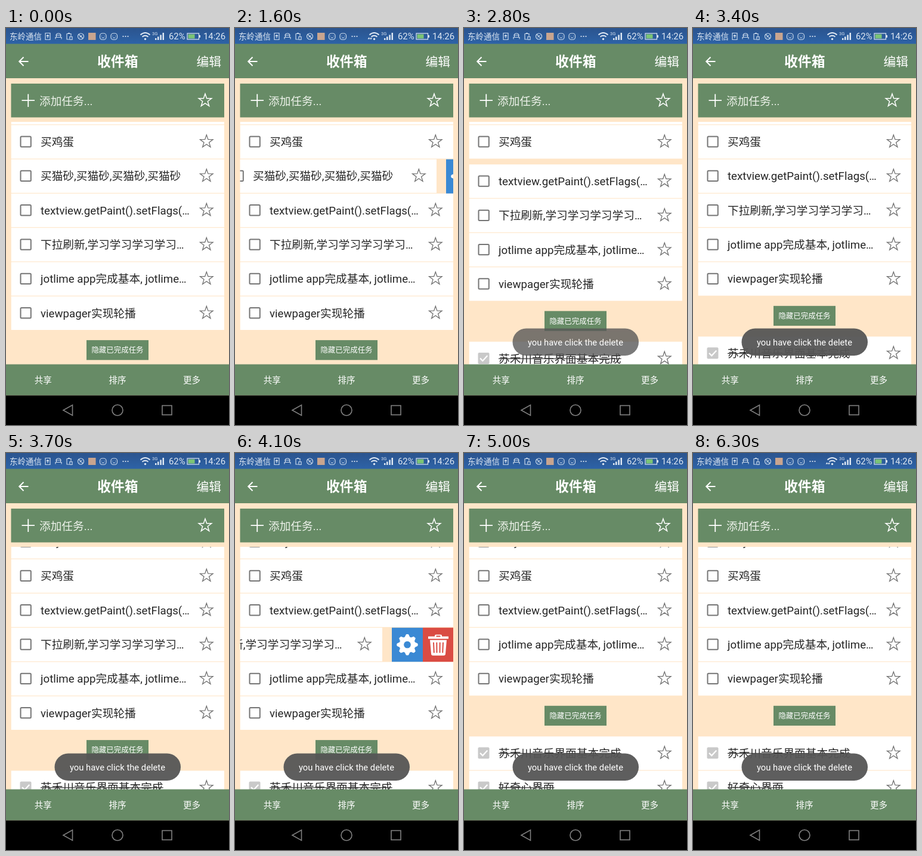
Recreate the animation shown at these times as an HTML page. Size 374 by 664 pixels, loop 6.4 s.

```html
<!DOCTYPE html>
<html lang="zh-CN">
<head>
<meta charset="utf-8">
<title>收件箱</title>
<style>
html, body { margin: 0; width: 100%; height: 100%; overflow: hidden; background: #000; }
svg { display: block; width: 374px; height: 664px; }
text { font-family: Roboto, "Noto Sans CJK SC", "Noto Sans CJK", sans-serif; white-space: pre; }
.mid { text-anchor: middle; }
.line { fill: none; stroke: #fff; }
</style>
</head>
<body>
<svg id="stage" viewBox="0 0 374 664">
  <defs>
    <linearGradient id="sky" x1="0" y1="0" x2="0" y2="1">
      <stop offset="0" stop-color="#2b548e"/><stop offset="1" stop-color="#2d63a8"/>
    </linearGradient>
    <clipPath id="listClip"><rect x="8.5" y="157" width="357.5" height="406"/></clipPath>
  </defs>
  <rect width="374" height="664" fill="#ffe6c8"/>
  <g id="list" clip-path="url(#listClip)"></g>

  <g id="status">
    <rect width="374" height="27" fill="url(#sky)"/>
    <g fill="#dfe8f3">
      <text x="6" y="19" font-size="13.5">东岭通信</text>
      <text x="273" y="19" font-size="14.9">62%</text>
      <text x="331" y="19" font-size="14.9">14:26</text>
      <text x="245" y="11.5" font-size="7.5">3G</text>
      <circle cx="196.5" cy="14" r="1.1"/><circle cx="200.5" cy="14" r="1.1"/><circle cx="204.5" cy="14" r="1.1"/>
      <path d="M250 20v-3h2.5v3zM254 20v-5.5h2.5v5.5zM258.300 20v-8.500h2.500v8.500zM262.500 20v-12h2.500v12z"/>
      <circle cx="233.500" cy="18.500" r="1.700"/>
    </g>
    <g class="line" style="stroke:#c9d8ea" stroke-width="1.2">
      <path d="M66 8.500h8v11h-8zM70 17v-5.500m-2 2l2-2 2 2"/>
      <path d="M83 18.500v-3h10v3M84.500 15.500v-4q0-2.500 3.500-2.500t3.500 2.500v4M83 12h10"/>
      <path d="M102 9.500h7v4M102 9.500v9.500h4M104 8.500h3M107 14.500h4v5h-4z"/>
      <circle cx="125.500" cy="14" r="5"/><path d="M122 10.500l7 7M123.500 15.500l4-3"/>
      <rect x="157.500" y="9" width="10.500" height="10.500" rx="4"/><path d="M160.500 13v1M165 13v1M160.500 16.500h4.500"/>
      <rect x="176" y="9" width="10.500" height="10.500" rx="4"/><path d="M179 13v1M183.500 13v1M179 16.500h4.500"/>
    </g>
    <rect x="138" y="8" width="12.500" height="12" fill="#c9a58f"/>
    <path class="line" stroke-width="1.900" style="stroke:#dfe8f3" d="M225.500 11.500q8-7 16 0M228.500 14.800q5-4.300 10 0"/>
    <path id="traffic" fill="#dfe8f3" d="M222.500 18.500l2-3 2 3zM226 16.500h4l-2 3z"/>
    <rect class="line" x="304" y="9" width="19.500" height="10" style="stroke:#dfe8f3" stroke-width="1.200"/>
    <rect x="324" y="12" width="2" height="4" fill="#dfe8f3"/>
    <rect x="305.500" y="10.500" width="11" height="7" fill="#7cc576"/>
  </g>

  <g id="header">
    <rect y="26.500" width="374" height="57.500" fill="#678b66"/>
    <path class="line" stroke-width="2" d="M37.500 56h-15M29.500 48.700l-7.300 7.300 7.300 7.300"/>
    <g fill="#fff">
      <text class="mid" x="187.300" y="64.300" font-size="22.850" font-weight="700">收件箱</text>
      <text x="319.500" y="64" font-size="20.800">编辑</text>
    </g>
    <rect x="8.500" y="93" width="357.500" height="56.500" fill="#678b66"/>
    <path class="line" stroke-width="1.800" d="M26.500 121.200h21.500M37.250 110.500v21.500"/>
    <text x="56" y="128.500" font-size="18.700" fill="#edf2ea">添加任务...</text>
    <path id="addStar" class="line" stroke-width="1.500" transform="translate(334 121.300)"/>
  </g>

  <g id="tabs" fill="#fff" font-size="14.540">
    <rect y="562.500" width="374" height="52" fill="#678b66"/>
    <text class="mid" x="62.300" y="594.300">共享</text>
    <text class="mid" x="187" y="594.300">排序</text>
    <text class="mid" x="311.500" y="594.300">更多</text>
  </g>
  <rect y="614.500" width="374" height="49.500" fill="#000"/>
  <g class="line" style="stroke:#808080" stroke-width="1.600">
    <path d="M111.500 630.500v17.500l-15.500-8.750z"/>
    <circle cx="187" cy="639.200" r="9"/>
    <rect x="262" y="631.500" width="16" height="15.500"/>
  </g>

  <g id="toast">
    <rect x="81.500" y="502.500" width="211.500" height="45.500" rx="22.750" fill="#565656" fill-opacity=".95"/>
    <text class="mid" x="187" y="531.300" font-size="14.750" fill="#fff">you have click the delete</text>
  </g>
</svg>
<script>
const LOOP = 6400, STEP = 100;
const PITCH = 57.3, ROW = 56.2, LEFT = 8.5, WIDTH = 357.5;
const FIRST = 162.3 - PITCH;
const $ = id => document.getElementById(id);
const list = $('list');

function add(parent, tag, attrs = {}, text) {
  const el = document.createElementNS('http://www.w3.org/2000/svg', tag);
  for (const k in attrs) el.setAttribute(k, attrs[k]);
  if (text) el.textContent = text;
  parent.appendChild(el);
  return el;
}

function ring(n, radius, turn) {
  const pts = [];
  for (let i = 0; i < n; i++) {
    const a = i * 2 * Math.PI / n + turn, r = radius(i);
    pts.push((r * Math.cos(a)).toFixed(2) + ' ' + (r * Math.sin(a)).toFixed(2));
  }
  return 'M' + pts.join('L') + 'Z';
}

const STAR = ring(10, i => i % 2 ? 4.5 : 11.3, -Math.PI / 2);
const GEAR = ring(32, i => i % 4 < 2 ? 17.2 : 13.2, -Math.PI / 32) +
  'M6.3 0A6.3 6.3 0 1 0 -6.3 0A6.3 6.3 0 1 0 6.3 0Z';
$('addStar').setAttribute('d', STAR);

function makeMenu(row) {
  const g = add(row, 'g', { transform: `translate(${LEFT + WIDTH + 16} 0)` });
  add(g, 'rect', { width: 52, height: ROW + 1, fill: '#3a89d4' });
  add(g, 'rect', { x: 52, width: 52, height: ROW + 1, fill: '#da4c43' });
  add(g, 'path', { d: GEAR, fill: '#fff', 'fill-rule': 'evenodd', stroke: '#fff',
    'stroke-width': 1, 'stroke-linejoin': 'round', transform: 'translate(26 28.5)' });
  const bin = add(g, 'g', { transform: 'translate(78 28.5)' });
  add(bin, 'path', { fill: '#fff', d: 'M-17-14h11v-1q0-2 2-2h8q2 0 2 2v1h11v4h-34zM-14-8h28l-2 23q0 3-3 3h-18q-3 0-3-3z' });
  add(bin, 'path', { fill: 'none', stroke: '#da4c43', 'stroke-width': 2,
    d: 'M-3.500-14.300h7M-8-4l.8 17.500M-2.700-4l.2 17.500M2.700-4l-.2 17.500M8-4l-.8 17.500' });
}

function makeRow(label, { done = false, menu = false } = {}) {
  const row = add(list, 'g');
  const mid = 27.7;
  add(row, 'rect', { x: LEFT, width: WIDTH, height: ROW, fill: '#fff' });
  if (done) {
    add(row, 'rect', { x: 23.5, y: mid - 9.5, width: 19, height: 19, rx: 2, fill: '#c9c9c9' });
    add(row, 'path', { class: 'line', 'stroke-width': 2.2, d: `M27 ${mid}l4.300 4.300 8-8.600` });
  } else {
    add(row, 'rect', { x: 24.5, y: mid - 8.5, width: 17.3, height: 17.3, rx: 1.5,
      fill: 'none', stroke: '#757575', 'stroke-width': 2 });
  }
  add(row, 'text', { x: 58, y: mid + 7.2, 'font-size': 18.7, fill: '#262626' }, label);
  if (done) add(row, 'rect', { x: 58, y: mid, width: 18.7 * label.length, height: 1.2, fill: '#333' });
  add(row, 'path', { d: STAR, fill: 'none', stroke: '#707070', 'stroke-width': 1.3,
    transform: `translate(336.300 ${mid})` });
  if (menu) makeMenu(row);
  return row;
}

const sand = makeRow('买猫砂,买猫砂,买猫砂,买猫砂', { menu: true });
const pull = makeRow('下拉刷新,学习学习学习学习…', { menu: true });
const rows = [
  makeRow('only'),
  makeRow('买鸡蛋'),
  sand,
  makeRow('textview.getPaint().setFlags(…'),
  pull,
  makeRow('jotlime app完成基本, jotlime…'),
  makeRow('viewpager实现轮播')
];
const button = add(list, 'g');
add(button, 'rect', { x: 135, width: 104, height: 33.2, fill: '#678b66' });
add(button, 'text', { class: 'mid', x: 187, y: 21.4, 'font-size': 12.46, fill: '#fff' }, '隐藏已完成任务');
const doneRows = ['苏禾川音乐界面基本完成', '好奇心界面'].map(s => makeRow(s, { done: true }));

// Linear interpolation through [time, value] pairs.
function track(t, keys) {
  if (t <= keys[0][0]) return keys[0][1];
  for (let i = 1; i < keys.length; i++) {
    const [t0, a] = keys[i - 1], [t1, b] = keys[i];
    if (t <= t1) return a + (b - a) * (t - t0) / (t1 - t0);
  }
  return keys[keys.length - 1][1];
}

const place = (el, x, y) => el.setAttribute('transform', `translate(${x.toFixed(2)} ${y.toFixed(2)})`);
const show = (el, on) => el.setAttribute('visibility', on ? 'visible' : 'hidden');

function draw(t) {
  const slide = new Map([
    [sand, track(t, [[1500, 0], [1600, -28], [1700, -62], [1800, -94], [1900, -114], [2000, -120]])],
    [pull, track(t, [[3800, 0], [3900, -30], [4000, -84], [4100, -119], [4200, -120]])]
  ]);
  const fold = new Map([
    [sand, track(t, [[2600, 0], [2700, 0.45], [2800, 0.85], [2900, 1]])],
    [pull, track(t, [[4800, 0], [4900, 0.55], [5000, 1]])]
  ]);
  show(sand, t < 2600);
  show(pull, t < 4800);

  let y = FIRST + track(t, [[3400, 0], [3500, 5], [3600, 11], [3700, 15.3]]);
  for (const row of rows) {
    place(row, slide.get(row) || 0, y);
    y += PITCH * (1 - (fold.get(row) || 0));
  }
  place(button, 0, y + 16);
  doneRows.forEach((row, i) => place(row, 0, y + 67.3 + i * PITCH));

  $('toast').setAttribute('opacity', track(t, [[2500, 0], [2600, 0.3], [2700, 0.65], [2900, 1],
    [4100, 1], [4500, 0], [4700, 0], [4800, 0.3], [5000, 1]]));
  show($('traffic'), (t >= 1600 && t < 2000) || t >= 6200);
}

const start = performance.now();
function tick() {
  const t = (performance.now() - start) % LOOP;
  draw(Math.floor(t / STEP) * STEP);
  requestAnimationFrame(tick);
}
draw(0);
requestAnimationFrame(tick);
</script>
</body>
</html>
```
